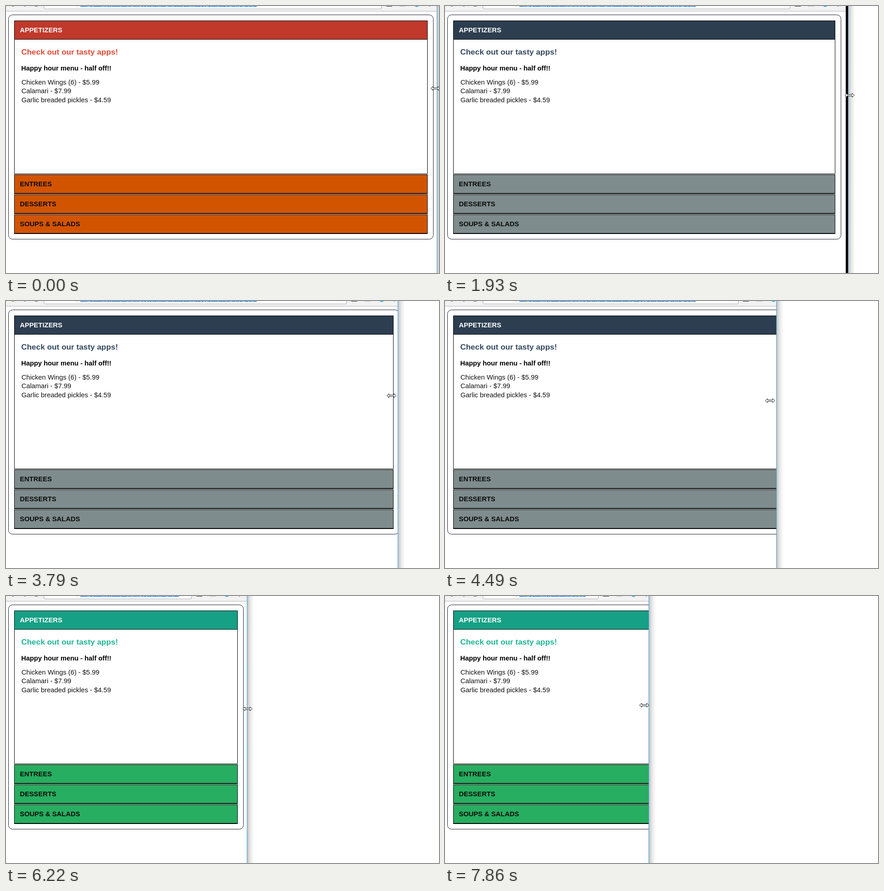
An HTML page that plays this animation: 953 px wide and 588 px high, repeating every 7.99 s.

```html
<!DOCTYPE html>
<html lang="en">
<head>
<meta charset="utf-8">
<title>Responsive menu</title>
<style>
  html, body { margin: 0; width: 100%; height: 100%; overflow: hidden; background: #fff; }
  svg { display: block; width: 100%; height: 100%; }
  text { font: 14.83px "Liberation Sans", Arial, sans-serif; fill: #111; }
  .bold { font-weight: bold; fill: #000; }
  .tab { font-weight: bold; font-size: 14.9px; fill: #0a0a0a; }
  .title { font-weight: bold; font-size: 17.35px; }
  .url { font-size: 14px; fill: #fff; }
  .line { fill: none; stroke: #000; }
</style>
</head>
<body>
<svg viewBox="0 0 953 588" preserveAspectRatio="none">
  <defs>
    <linearGradient id="fade">
      <stop offset="0" stop-color="#000" stop-opacity=".24"/>
      <stop offset=".45" stop-color="#000" stop-opacity=".09"/>
      <stop offset="1" stop-color="#000" stop-opacity="0"/>
    </linearGradient>
    <clipPath id="view"><rect id="viewBox" height="588"/></clipPath>
    <clipPath id="picked"><rect id="pickedBox" x="164" height="3"/></clipPath>
  </defs>
  <rect id="gap" height="588" fill="#000"/>
  <g clip-path="url(#view)">
    <rect width="953" height="588" fill="#fff"/>
    <rect width="953" height="11" fill="#f2f2f2"/>
    <rect y="11" width="953" height="1" fill="#b4b4b4"/>
    <path d="M13 .5h4M40 .5h3" stroke="#666"/>
    <path d="M62 -1q4.500 3 9 0" fill="none" stroke="#5a5a96" stroke-width="1.500"/>
    <rect id="field" x="83.500" y="-10" height="16.500" rx="2.500" fill="#fff" stroke="#a8a8a8"/>
    <path d="M156.500 0v2" stroke="#aaa"/>
    <g clip-path="url(#picked)">
      <rect x="164" width="400" height="2" fill="#3390ff"/>
      <text class="url" x="165" y="0.500">https://tastymenu.pages.example/menus/responsive/playground/accordion</text>
    </g>
    <g id="icons">
      <path d="M-141 0l2 -1.500M-133 0l-2 -1.500" stroke="#888"/>
      <rect x="-112" width="13" height="1" fill="#222"/>
      <rect x="-83" width="14" height="1" fill="#bbb"/>
      <circle cx="-45" cy="-4" r="6" fill="#1daeec"/>
      <rect x="-18" y="-1" width="2" height="2" fill="#555"/>
    </g>
    <rect id="frame" x="5.500" y="19.500" height="494" rx="9" fill="none" stroke="#1c1c30"/>
    <g id="menu"></g>
  </g>
  <rect id="shade" width="15" height="588" fill="url(#fade)"/>
  <rect id="rim" width="1" height="588" fill="#3aa5e0"/>
  <path id="cursor" d="M-10.500 0L-5.500 -4.500V-1.500H5.500V-4.500L10.500 0L5.500 4.500V1.500H-5.500V4.500Z" fill="#fff" stroke="#111"/>
</svg>
<script>
const LOOP = 7990;
const BAR_LAG = 200, PAGE_LAG = 260, CURSOR_LEAD = 80;
const $ = id => document.getElementById(id);

// Turning points of the drag: [time, position]
const edgePath = [
  [0, 949], [860, 908], [950, 875], [1500, 875], [2200, 896], [2400, 916],
  [2560, 916], [3560, 873], [3790, 863], [4720, 687], [5080, 697], [5280, 669],
  [5950, 531], [6440, 531], [7500, 489], [7660, 460], [7860, 449], [7940, 438]
];
const heightPath = [[0, 181], [1150, 187], [2560, 205], [3790, 208], [6220, 249], [7860, 240]];

const themes = [
  { from: 0, head: "#c0392b", tab: "#d35400", title: "#e04b35" },
  { from: 1150, head: "#2c3e50", tab: "#7f8c8d", title: "#34495e" },
  { from: 6150, head: "#16a085", tab: "#27ae60", title: "#1fb596" }
];

function set(el, attrs) {
  for (const k in attrs) el.setAttribute(k, attrs[k]);
  return el;
}

function add(tag, attrs, label = "") {
  const el = set(document.createElementNS("http://www.w3.org/2000/svg", tag), attrs);
  el.textContent = label;
  return $("menu").appendChild(el);
}

const box = (y, height) => add("rect", { x: 18.5, y, height, class: "line" });
const write = (x, y, label, cls) => add("text", { x, y, class: cls }, label);

const head = box(32.5, 41);
const body = box(73.5, 296);
const tabs = [], feet = [];
["ENTREES", "DESSERTS", "SOUPS & SALADS"].forEach((label, i) => {
  const y = 371.5 + 44 * i;
  tabs.push(box(y, 41));
  feet.push(add("rect", { x: 18, y: y + 40.5, height: 2 }));
  write(30.5, y + 25, label, "tab");
});
write(30.5, 58, "APPETIZERS", "tab").style.fill = "#fff";
const title = write(33.5, 107, "Check out our tasty apps!", "title");
write(33.5, 142, "Happy hour menu - half off!!", "bold");
["Chicken Wings (6) - $5.99", "Calamari - $7.99", "Garlic breaded pickles - $4.59"]
  .forEach((item, i) => write(34, 173 + 19.4 * i, item));

// Linear position along a path, held at both ends
function at(path, t) {
  const i = path.findIndex(point => point[0] > t);
  if (i < 0) return path[path.length - 1][1];
  if (i === 0) return path[0][1];
  const [t0, v0] = path[i - 1], [t1, v1] = path[i];
  return v0 + (v1 - v0) * (t - t0) / (t1 - t0);
}

const edgeAt = t => Math.round(at(edgePath, t));

function draw(t) {
  // Toolbar and page catch up with the window edge, which follows the cursor
  const edge = edgeAt(t), bar = edgeAt(t - BAR_LAG), page = edgeAt(t - PAGE_LAG);
  const x = edgeAt(t + CURSOR_LEAD) + 0.5;
  const y = Math.floor(at(heightPath, t)) + 0.5;
  const theme = themes.filter(th => th.from <= t).pop();

  set($("viewBox"), { width: Math.min(edge, bar) });
  set($("gap"), { width: edge });
  set($("rim"), { x: edge - 1 });
  set($("shade"), { x: edge });
  set($("field"), { width: bar - 123 - 83 });
  set($("pickedBox"), { width: Math.min(552, bar - 150) - 164 });
  set($("icons"), { transform: `translate(${bar})` });
  set($("frame"), { width: page - 8.5 - 5.5 });
  set($("cursor"), { transform: `translate(${x} ${y})` });

  const width = page - 21.5 - 18.5;
  [head, body, ...tabs].forEach(el => set(el, { width }));
  feet.forEach(el => set(el, { width: width + 1 }));
  head.style.fill = theme.head;
  tabs.forEach(el => el.style.fill = theme.tab);
  title.style.fill = theme.title;
}

const begin = performance.now();
function tick() {
  draw((performance.now() - begin) % LOOP);
  requestAnimationFrame(tick);
}
tick();
</script>
</body>
</html>
```
